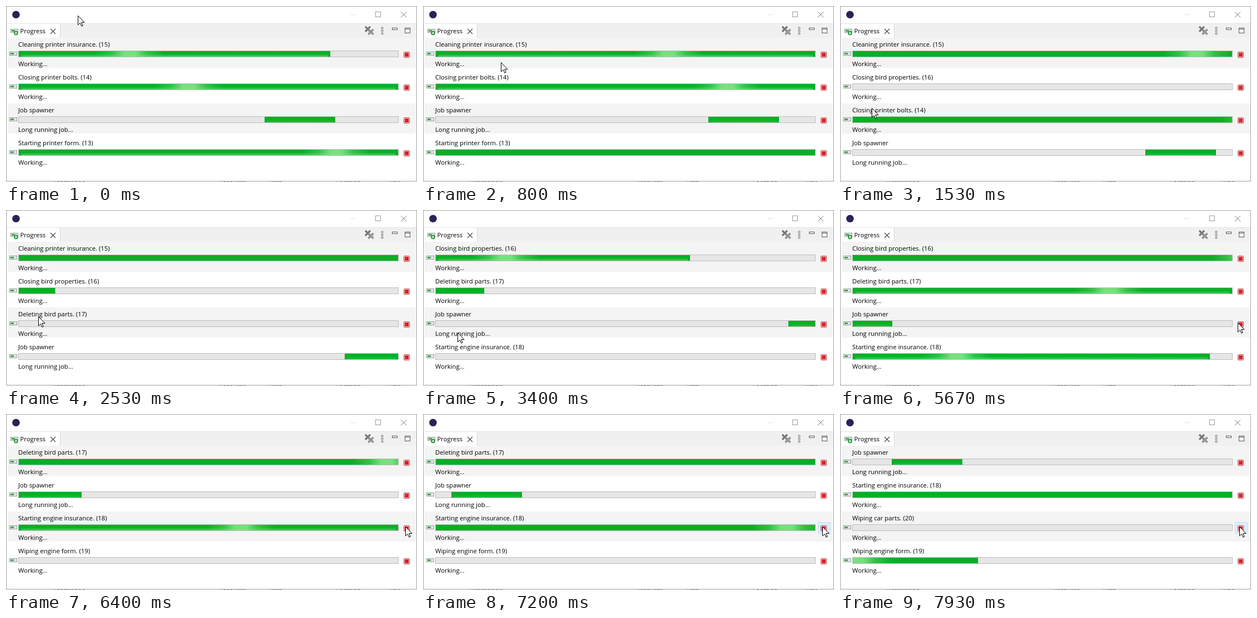
Write an HTML page that moves like this. It is 739 px wide and 316 px high and loops after 8000 ms.

```html
<!DOCTYPE html>
<html lang="en">
<head>
<meta charset="utf-8">
<title>Progress view</title>
<style>
  html, body { margin: 0; width: 100%; height: 100%; overflow: hidden; background: #fff; }
  svg { display: block; }
  text { font: 11.3px "Open Sans", "Noto Sans", sans-serif; fill: #000; white-space: pre; }
  .behind text { fill: #777; }
</style>
</head>
<body>
<svg id="stage" width="739" height="316" viewBox="0 0 739 316">
  <defs>
    <linearGradient id="glow">
      <stop offset="0" stop-color="#7fe584" stop-opacity="0"/>
      <stop offset=".25" stop-color="#7fe584" stop-opacity=".35"/>
      <stop offset=".42" stop-color="#7fe584" stop-opacity=".92"/>
      <stop offset=".58" stop-color="#7fe584" stop-opacity=".92"/>
      <stop offset=".75" stop-color="#7fe584" stop-opacity=".35"/>
      <stop offset="1" stop-color="#7fe584" stop-opacity="0"/>
    </linearGradient>
    <linearGradient id="sheen" x2="0" y2="1">
      <stop offset="0" stop-color="#6fdc7c" stop-opacity="0"/>
      <stop offset="1" stop-color="#6fdc7c" stop-opacity=".65"/>
    </linearGradient>
    <g id="barIcon">
      <rect x=".5" y=".5" width="13" height="6" fill="#f4f8f4" stroke="#8a968f"/>
      <rect x="2" y="2" width="6" height="3" fill="#3f9f52"/>
      <rect x="8" y="2" width="4" height="3" fill="#cfe0ea"/>
    </g>
    <g id="stop">
      <rect x=".5" y=".5" width="10" height="10" rx="1.5" fill="#fbdcd8" stroke="#b5433f"/>
      <rect x="2" y="2" width="7" height="7" fill="#dc1f2b"/>
    </g>
    <path id="cross" d="M1 1 10 10M10 1 1 10"/>
  </defs>

  <rect width="739" height="316" fill="#fff"/>
  <g class="behind">
    <text x="83" y="321">Description</text>
    <text x="383" y="321">Resource</text>
    <text x="473" y="321">Path</text>
    <text x="593" y="321">Location</text>
    <text x="685" y="321">Type</text>
  </g>
  <rect x=".5" y=".5" width="738" height="314" fill="#fff" stroke="#a3a3a3"/>

  <circle cx="18" cy="15.5" r="6.8" fill="#2c2255"/>
  <g fill="none">
    <path d="M619 15.5h10" stroke="#e2e2e2"/>
    <rect x="664.5" y="10.5" width="9" height="9" stroke="#999"/>
    <path d="M710 10.5l10 10M720 10.5l-10 10" stroke="#777"/>
  </g>

  <rect x="1" y="31" width="737" height="26" fill="#f0f0f0"/>
  <path d="M1 31.5H738" stroke="#e2e2e2"/>
  <path d="M2 57V32H97V57Z" fill="#fff"/>
  <path d="M97.5 32V57" stroke="#d4d4d4"/>
  <use href="#barIcon" x="8" y="41"/>
  <circle cx="18" cy="48.5" r="4" fill="#3a9d4b"/>
  <path d="M16.8 46.3v4.4l3.4-2.2z" fill="#fff"/>
  <text x="25.5" y="49">Progress</text>
  <use href="#cross" x="79" y="40" stroke="#444" stroke-width="1.2"/>
  <g fill="none" stroke="#777" stroke-width="3.2">
    <use href="#cross" x="645" y="36"/>
    <use href="#cross" x="650.5" y="41"/>
    <use href="#cross" x="650.5" y="41" stroke="#aaa" stroke-width="1.3"/>
  </g>
  <g fill="#fff" stroke="#555">
    <circle cx="676.5" cy="39.5" r="1.6"/>
    <circle cx="676.5" cy="44.5" r="1.6"/>
    <circle cx="676.5" cy="49.5" r="1.6"/>
    <rect x="694.5" y="39.5" width="9" height="3"/>
    <rect x="717.5" y="39.5" width="9" height="9"/>
    <path d="M717 41.5h10"/>
  </g>

  <g fill="#f4f4f4">
    <rect x="2" y="57" width="736" height="54"/>
    <rect x="2" y="175" width="736" height="54"/>
    <rect id="fifthBand" x="2" y="293" width="736" height="21"/>
  </g>
  <rect id="hover" x="710.5" width="22" height="20" fill="#dcecfa" stroke="#c6e0f5"/>
  <svg id="rows" width="739" height="314"></svg>
  <g id="scrollbar">
    <rect x="720" y="57" width="17" height="257" fill="#f0f0f0"/>
    <rect x="720" y="74" width="17" height="196" fill="#cdcdcd"/>
    <path d="M725 67.5l3.5-3.5 3.5 3.5M725 304.5l3.5 3.5 3.5-3.5" fill="none" stroke="#606060" stroke-width="1.6"/>
  </g>
  <path id="cursor" d="M.5.5V17L4.3 13.4 6.8 19.2 9.2 18.2 6.7 12.5H12Z" fill="#fff" stroke="#000"/>
</svg>
<script>
const LOOP = 8000, ROW = 59, TOP = 57, BAR = 682;
const $ = id => document.getElementById(id);

// Times in ms. fill: [start, px per second]; glow: [time, centre x, px per second].
const jobs = [
  { name: 'Cleaning printer insurance. (15)', to: 3130, fill: [-1244, 450], glow: [0, 222, 274] },
  { name: 'Closing bird properties. (16)', from: 1330, to: 6330, fill: [2385, 450], glow: [3400, 148, 256] },
  { name: 'Closing printer bolts. (14)', to: 2270, fill: [-3000, 450], glow: [0, 328, 274] },
  { name: 'Deleting bird parts. (17)', from: 2130, to: 7670, fill: [3182, 399], glow: [4670, 210, 274] },
  { name: 'Job spawner', note: 'Long running job...' },
  { name: 'Starting engine insurance. (18)', from: 3270, fill: [4310, 472], glow: [5670, 210, 290] },
  { name: 'Starting printer form. (13)', to: 1470, fill: [-3000, 450], glow: [0, 593, 274] },
  { name: 'Wiping car parts. (20)', from: 7530 },
  { name: 'Wiping engine form. (19)', from: 6200, fill: [7430, 450], glow: [7930, 32, 274] }
];

// Pointer stops: time, x, y
const path = [
  [0, 129, 17], [300, 129, 17], [870, 142, 112], [1450, 57, 183], [2400, 57, 183],
  [3000, 62, 220], [3600, 62, 220], [4670, 401, 205], [5200, 640, 203],
  [5600, 714, 202], [5850, 718, 202], [LOOP, 718, 202]
];

const clamp = (v, lo, hi) => Math.min(hi, Math.max(lo, v));
const set = (el, attrs) => { for (const k in attrs) el.setAttribute(k, attrs[k]); };
const show = (el, on) => { el.style.display = on ? '' : 'none'; };

for (const job of jobs) {
  const g = document.createElementNS('http://www.w3.org/2000/svg', 'g');
  g.innerHTML = `
    <text x="22" y="16">${job.name}</text>
    <text x="22" y="51">${job.note || 'Working...'}</text>
    <use href="#barIcon" x="6" y="25"/>
    <rect class="frame" x="22.5" y="23.5" height="11" fill="#e6e6e6" stroke="#bcbcbc"/>
    <svg class="bar" y="24" height="10">
      <rect width="100%" height="10" fill="#06b025"/>
      <rect class="sheen" x="4" y="5" height="5" rx="2" fill="url(#sheen)"/>
      <rect class="glow" width="124" height="10" fill="url(#glow)"/>
    </svg>
    <use class="stop" href="#stop" y="25"/>`;
  $('rows').append(g);
  job.el = g;
  job.parts = {};
  for (const part of ['frame', 'bar', 'sheen', 'glow', 'stop']) {
    job.parts[part] = g.querySelector('.' + part);
  }
}

function drawJob(job, row, t, width) {
  const { frame, bar, sheen, glow, stop } = job.parts;
  const right = 23 + width;
  let left = 23, end = 23, shine = 0, glowX = -200;
  if (job.note) {
    const step = Math.floor((t + 100) / 109);
    const start = (465 + 6 * step + 104) % 810 - 104;
    left = clamp(start, 23, right);
    end = clamp(start + 127, 23, right);
    shine = .45;
  } else if (job.fill) {
    const [start, rate] = job.fill;
    end = 23 + clamp((t - start) / 1000 * rate, 0, BAR) * width / BAR;
    const [at, x, speed] = job.glow;
    glowX = x + (t - at) / 1000 * speed;
    shine = clamp(Math.min((glowX - 60) / 60, (635 - glowX) / 35), 0, 1);
  }
  set(job.el, { transform: `translate(0 ${TOP + ROW * row})` });
  set(frame, { width: width + 1 });
  set(bar, { x: left, width: Math.max(0, end - left) });
  set(sheen, { width: Math.max(0, end - left - 8), opacity: shine });
  set(glow, { x: glowX - 62 - left });
  set(stop, { x: right + 10 });
  show(bar, end > left);
}

function drawPointer(t) {
  const i = path.findIndex(p => p[0] > t);
  const [a, b] = [path[i - 1], path[i]];
  const k = (t - a[0]) / (b[0] - a[0]);
  const at = n => Math.round(a[n] + (b[n] - a[n]) * k);
  set($('cursor'), { transform: `translate(${at(1)} ${at(2)})` });
}

function drawHover(t) {
  const leaving = t >= 6330 && t < 6500;
  set($('hover'), { y: leaving ? 135.5 : 194.5, opacity: leaving ? .25 : 1 });
  show($('hover'), t >= 5720 && t < 6500 || t >= 6900);
}

function draw(now) {
  const t = now % LOOP;
  const live = jobs.filter(j => t >= (j.from ?? 0) && t < (j.to ?? LOOP));
  const crowded = live.length > 4;
  for (const job of jobs) show(job.el, live.includes(job));
  live.forEach((job, row) => drawJob(job, row, t, crowded ? BAR - 17 : BAR));
  show($('scrollbar'), crowded);
  show($('fifthBand'), crowded);
  drawHover(t);
  drawPointer(t);
}

const begin = performance.now();
function tick() {
  draw(Math.max(0, performance.now() - begin));
  requestAnimationFrame(tick);
}
tick();
</script>
</body>
</html>
```
